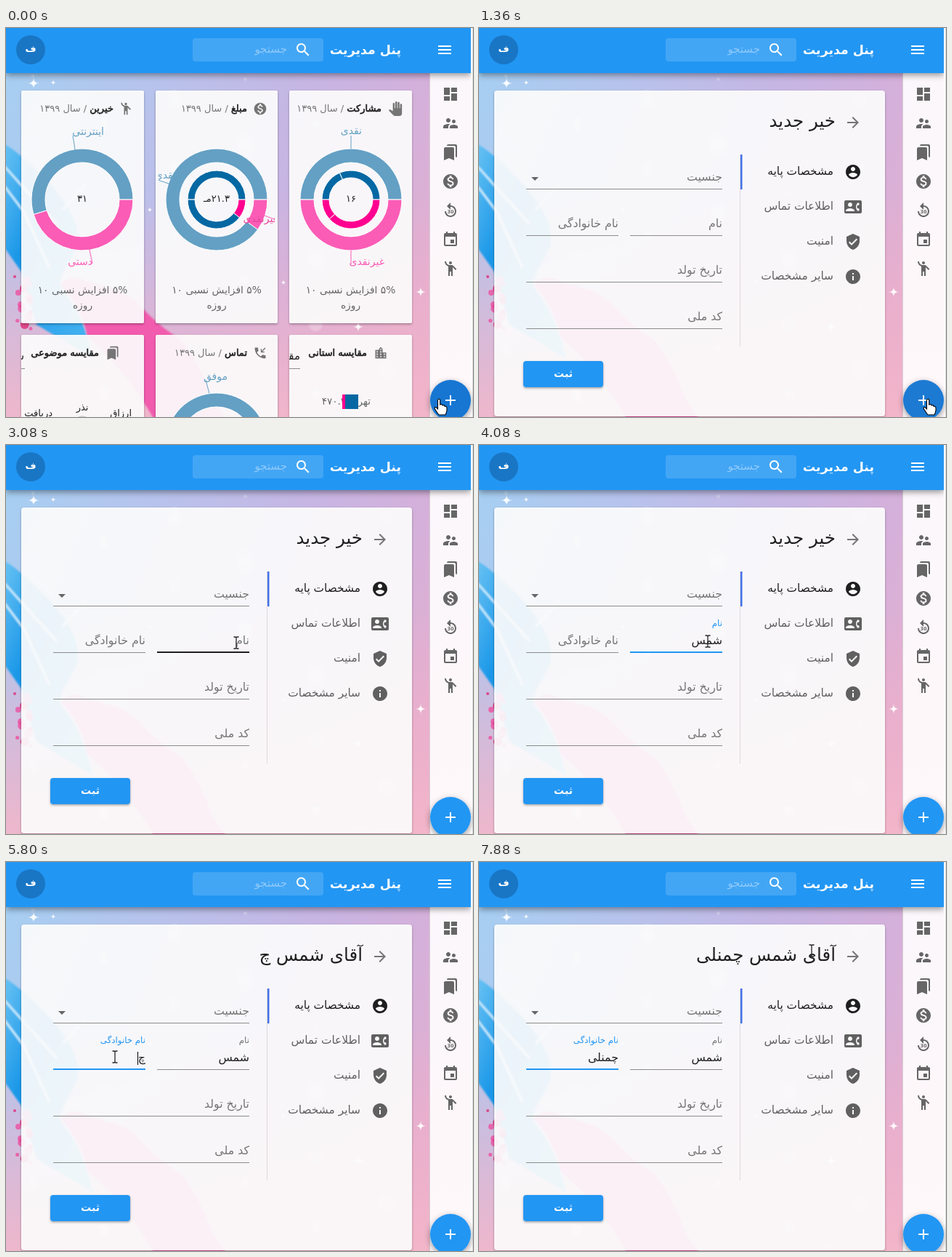
An HTML page for the animation above (8000 ms loop, 643 px wide and 535 px high).

```html
<!DOCTYPE html>
<html lang="fa">
<head>
<meta charset="utf-8">
<style>
html,body{margin:0;width:100%;height:100%;overflow:hidden;background:#fff}
svg{display:block;width:643px;height:535px;font-family:"DejaVu Sans",sans-serif}
text{direction:rtl}
.ltr{direction:ltr}
</style>
</head>
<body>
<svg id="stage" viewBox="0 0 643 535" xmlns="http://www.w3.org/2000/svg">
<defs>
  <linearGradient id="sky" x1="0" y1="0" x2="1" y2=".3">
    <stop offset="0" stop-color="#a6cff2"/><stop offset=".3" stop-color="#b7c3ec"/>
    <stop offset=".6" stop-color="#c6b6e4"/><stop offset=".85" stop-color="#d5b0da"/><stop offset="1" stop-color="#e2b0d0"/>
  </linearGradient>
  <linearGradient id="glow" x1="0" y1="0" x2="0" y2="1">
    <stop offset=".35" stop-color="#f3a9c8" stop-opacity="0"/><stop offset="1" stop-color="#f4b6c8" stop-opacity=".9"/>
  </linearGradient>
  <linearGradient id="arm" x1="0" y1="0" x2="1" y2="1">
    <stop offset="0" stop-color="#6cc4f4"/><stop offset=".35" stop-color="#1a97e8"/><stop offset="1" stop-color="#4ab6f2"/>
  </linearGradient>
  <filter id="soft"><feGaussianBlur stdDeviation="1.2"/></filter>
  <filter id="drop" x="-20%" y="-20%" width="140%" height="150%"><feDropShadow dx="0" dy="1.5" stdDeviation="1.5" flood-opacity=".35"/></filter>
  <filter id="lift" x="-60%" y="-60%" width="220%" height="220%"><feDropShadow dx="0" dy="3" stdDeviation="4" flood-opacity=".4"/></filter>
  <filter id="high" x="-80%" y="-80%" width="260%" height="260%"><feDropShadow dx="0" dy="6" stdDeviation="8" flood-opacity=".45"/></filter>
  <clipPath id="page"><rect y="62" width="640" height="473"/></clipPath>
  <clipPath id="c0"><rect x="21" y="86" width="169" height="449"/></clipPath>
  <clipPath id="c1"><rect x="210" y="86" width="160" height="449"/></clipPath>
  <clipPath id="c2"><rect x="390" y="86" width="169" height="449"/></clipPath>
</defs>
<g id="back" clip-path="url(#page)"></g>
<g id="dash"></g>
<g id="form"></g>
<g id="frame"></g>
<g id="top"></g>
</svg>
<script>
const LOOP = 8000;
const BLUE = '#2196f3', INK = '#1f1f1f', GREY = '#757575', LINE = '#8c8c8c';
const PALE = '#64a0c4', PINK = '#fa5cb6', DEEP = '#0568a3', HOT = '#ff0090';
const FIRST = 'شمس', LAST = 'چمنلی';
const $ = id => document.getElementById(id);
const add = (id, markup) => $(id).insertAdjacentHTML('beforeend', markup);

const disc = 'M12 2C6.48 2 2 6.48 2 12s4.48 10 10 10 10-4.48 10-10S17.52 2 12 2z';
const icons = {
  menu: 'M3 18h18v-2H3v2zm0-5h18v-2H3v2zm0-7v2h18V6H3z',
  search: 'M15.5 14h-.79l-.28-.27C15.41 12.59 16 11.11 16 9.5 16 5.91 13.09 3 9.5 3S3 5.91 3 9.5 5.91 16 9.5 16c1.61 0 3.09-.59 4.23-1.57l.27.28v.79l5 4.99L20.49 19zM9.5 14C7.01 14 5 11.99 5 9.5S7.01 5 9.5 5 14 7.01 14 9.5 11.99 14 9.5 14z',
  board: 'M3 13h8V3H3zm0 8h8v-6H3zm10 0h8V11h-8zm0-18v6h8V3z',
  people: 'M16.5 12c1.38 0 2.49-1.12 2.49-2.5S17.88 7 16.5 7 14 8.12 14 9.5s1.12 2.5 2.5 2.5zM9 11c1.66 0 2.99-1.34 2.99-3S10.66 5 9 5 6 6.34 6 8s1.34 3 3 3zm7.5 3c-1.83 0-5.5.92-5.5 2.75V19h11v-2.25c0-1.83-3.67-2.75-5.5-2.75zM9 13c-2.33 0-7 1.17-7 3.5V19h7v-2.25c0-.85.33-2.34 2.37-3.47C10.5 13.1 9.66 13 9 13z',
  marks: 'M19 18l2 1V3c0-1.1-.9-2-2-2H8.99C7.89 1 7 1.9 7 3h10c1.1 0 2 .9 2 2zM15 5H5c-1.1 0-2 .9-2 2v16l7-3 7 3V7c0-1.1-.9-2-2-2z',
  money: disc + 'm1.41 16.09V20h-2.67v-1.93c-1.71-.36-3.16-1.46-3.27-3.4h1.96c.1 1.05.82 1.87 2.65 1.87 1.96 0 2.4-.98 2.4-1.59 0-.83-.44-1.61-2.67-2.14-2.48-.6-4.18-1.62-4.18-3.67 0-1.72 1.39-2.84 3.11-3.21V4h2.67v1.95c1.86.45 2.79 1.86 2.85 3.39H14.3c-.05-1.11-.64-1.87-2.22-1.87-1.5 0-2.4.68-2.4 1.64 0 .84.65 1.39 2.67 1.91s4.18 1.39 4.18 3.91c-.01 1.83-1.38 2.83-3.12 3.16z',
  replay: 'M12 5V1L7 6l5 5V7c3.31 0 6 2.69 6 6s-2.69 6-6 6-6-2.69-6-6H4c0 4.42 3.58 8 8 8s8-3.58 8-8-3.58-8-8-8z',
  event: 'M17 12h-5v5h5zM16 1v2H8V1H6v2H5c-1.11 0-1.99.9-1.99 2L3 19c0 1.1.89 2 2 2h14c1.1 0 2-.9 2-2V5c0-1.1-.9-2-2-2h-1V1zm3 18H5V8h14z',
  wave: 'M12 2a2 2 0 1 0 .01 0zM15.89 8.11C15.5 7.72 14.83 7 13.53 7h-2.54C8.24 6.99 6 4.75 6 2H4c0 3.16 2.11 5.84 5 6.71V22h2v-6h2v6h2V10.05L18.95 14l1.41-1.41z',
  hand: 'M23 5.5V20c0 2.2-1.8 4-4 4h-7.3c-1.08 0-2.1-.43-2.85-1.19L1 14.83s1.26-1.23 1.3-1.25c.22-.19.49-.29.79-.29.22 0 .42.06.6.16.04.01 4.31 2.46 4.31 2.46V4c0-.83.67-1.5 1.5-1.5S11 3.17 11 4v7h1V1.5c0-.83.67-1.5 1.5-1.5S15 .67 15 1.5V11h1V2.5c0-.83.67-1.5 1.5-1.5s1.5.67 1.5 1.5V11h1V5.5c0-.83.67-1.5 1.5-1.5s1.5.67 1.5 1.5z',
  call: 'M20 15.5c-1.25 0-2.45-.2-3.57-.57-.35-.1-.74-.04-1.02.24l-2.2 2.2c-2.83-1.44-5.15-3.75-6.59-6.58l2.2-2.21c.28-.27.36-.66.25-1.01C8.7 6.45 8.5 5.25 8.5 4c0-.55-.45-1-1-1H4c-.55 0-1 .45-1 1 0 9.39 7.61 17 17 17 .55 0 1-.45 1-1v-3.5c0-.55-.45-1-1-1zM13 11h6V9.5h-3.4L21 4.1 19.9 3l-5.4 5.4V5H13z',
  city: 'M15 11V5l-3-3-3 3v2H3v14h18V11zm-8 8H5v-2h2zm0-4H5v-2h2zm0-4H5V9h2zm6 8h-2v-2h2zm0-4h-2v-2h2zm0-4h-2V9h2zm0-4h-2V5h2zm6 12h-2v-2h2zm0-4h-2v-2h2z',
  user: disc + 'm0 3c1.66 0 3 1.34 3 3s-1.34 3-3 3-3-1.34-3-3 1.34-3 3-3zm0 14.2c-2.5 0-4.71-1.28-6-3.22.03-1.99 4-3.08 6-3.08 1.99 0 5.97 1.09 6 3.08-1.29 1.94-3.5 3.22-6 3.22z',
  contact: 'M22 3H2C.9 3 0 3.9 0 5v14c0 1.1.9 2 2 2h20c1.1 0 2-.9 2-2V5c0-1.1-.9-2-2-2zM8 6c1.66 0 3 1.34 3 3s-1.34 3-3 3-3-1.34-3-3 1.34-3 3-3zm6 12H2v-1c0-2 4-3.1 6-3.1s6 1.1 6 3.1zm3.85-4h1.64L21 16l-1.99 1.99c-1.31-.98-2.28-2.38-2.73-3.99-.37-1.3-.37-2.7 0-4 .45-1.62 1.42-3.01 2.73-3.99L21 8l-1.51 2h-1.64c-.45 1.3-.45 2.7 0 4z',
  shield: 'M12 1L3 5v6c0 5.55 3.84 10.74 9 12 5.16-1.26 9-6.45 9-12V5zm-2 16l-4-4 1.41-1.41L10 14.17l6.59-6.59L18 9z',
  info: disc + 'm1 15h-2v-6h2zm0-8h-2V7h2z',
  next: 'M12 4l-1.41 1.41L16.17 11H4v2h12.17l-5.58 5.59L12 20l8-8z',
  plus: 'M19 13h-6v6h-2v-6H5v-2h6V5h2v6h6z',
  drop: 'M7 10l5 5 5-5z'
};

const icon = (name, x, y, fill = '#666', size = 24) =>
  `<path d="${icons[name]}" fill="${fill}" fill-rule="evenodd" transform="translate(${x - size / 2} ${y - size / 2}) scale(${size / 24})"/>`;
const text = (s, x, y, size, fill, extra = '') =>
  `<text x="${x}" y="${y}" font-size="${size}" fill="${fill}" ${extra}>${s}</text>`;
const rect = (x, y, w, h, fill, extra = '') =>
  `<rect x="${x}" y="${y}" width="${w}" height="${h}" fill="${fill}" ${extra}/>`;
const stroke = (d, color, width = 1) => `<path d="${d}" fill="none" stroke="${color}" stroke-width="${width}"/>`;
const MID = 'text-anchor="middle" ', BOLD = 'font-weight="bold"';
// A semibold look that keeps the width of the regular face.
const heavy = color => `stroke="${color}" stroke-width=".6"`;

// Ring sector; angles in degrees, counterclockwise from the right.
function sector(cx, cy, r, R, a, b, fill) {
  const at = (q, deg) => {
    const t = deg * Math.PI / 180;
    return `${cx + q * Math.cos(t)} ${cy - q * Math.sin(t)}`;
  };
  const big = b - a > 180 ? 1 : 0;
  return `<path d="M${at(R, a)}A${R} ${R} 0 ${big} 0 ${at(R, b)}L${at(r, b)}A${r} ${r} 0 ${big} 1 ${at(r, a)}z" fill="${fill}" stroke="#fff"/>`;
}
const outer = (cx, cy, cut) => sector(cx, cy, 51, 70, 0, cut, PALE) + sector(cx, cy, 51, 70, cut, 360, PINK);
const inner = (cx, cy, ...parts) => parts.map(([a, b, c]) => sector(cx, cy, 30, 40, a, b, c)).join('');

function drawBack() {
  let s = rect(0, 62, 640, 473, 'url(#sky)') + rect(0, 62, 640, 473, 'url(#glow)');
  // Out-of-focus lights.
  s += '<g filter="url(#soft)" fill="#fff">';
  for (let i = 0; i < 40; i++) {
    const x = (i * 97.3 + 38) % 584, y = 66 + (i * 61.7 + 9) % 465;
    s += `<circle cx="${x}" cy="${y}" r="${2 + i % 5 * 2.5}" opacity="${.4 - i % 5 * .05}"/>`;
  }
  s += '</g><g filter="url(#soft)">';
  s += '<path d="M-5 158C14 168 40 192 62 216 84 242 104 270 98 300 88 325 72 340 75 356 90 375 108 400 120 455L96 440 42 408 21 335-5 298z" fill="url(#arm)"/>';
  s += stroke('M-4 215L24 252 60 330M-4 188L20 215 70 270M110 215L78 250', '#c4e9fc', 3);
  s += '<path d="M75 353Q90 338 110 348L143 358Q165 362 184 381 212 412 239 427 262 450 285 511L305 540H205Q165 470 112 425 105 385 75 353z" fill="#f25bae"/>';
  s += '</g>';
  for (let i = 0; i < 14; i++)
    s += `<circle cx="${12 + 22 * Math.abs(Math.sin(i * 2.3))}" cy="${342 + i * 5.5}" r="${2 + 4 * Math.abs(Math.sin(i * 1.7))}" fill="${i % 3 ? '#ee4a9c' : '#e0206f'}" opacity=".75"/>`;
  for (const [x, y, r] of [[38, 76, 8], [65, 75, 4], [198, 250, 4], [485, 411, 7], [571, 363, 7], [382, 350, 4]])
    s += `<path d="M${x - r} ${y}Q${x} ${y} ${x} ${y - r} ${x} ${y} ${x + r} ${y} ${x} ${y} ${x} ${y + r} ${x} ${y} ${x - r} ${y}z" fill="#fff" opacity=".9"/>`;
  add('back', s);
}

function drawDash() {
  let s = '';
  const cards = [[21, 'خیرین', 'wave', 148, 165], [206, 'مبلغ', 'money', 332, 350], [390, 'مشارکت', 'hand', 517, 536]];
  const title = (name, x, y, year) =>
    text(`<tspan fill="${INK}" ${heavy(INK)}>${name}</tspan>${year ? ' / سال ۱۳۹۹' : ''}`, x, y, 13, GREY);
  for (const [x, name, pic, right, ix] of cards) {
    const w = x === 206 ? 168 : 169, mid = x + w / 2;
    s += rect(x, 86, w, 320, '#fff', 'fill-opacity=".9" rx="2" filter="url(#drop)"');
    s += rect(x, 422, w, 130, '#fff', 'fill-opacity=".9" rx="2" filter="url(#drop)"');
    s += title(name, right, 115, true) + icon(pic, ix, 111, GREY, 20);
    s += text('۵% افزایش نسبی ۱۰', mid, 365, 13.8, '#666', MID) + text('روزه', mid, 386, 13.8, '#666', MID);
  }
  s += outer(105, 236, 197) + text('۳۱', 105, 239, 13, INK, MID);
  s += stroke('M95 167L92 148', PALE) + text('اینترنتی', 135, 147, 14, PALE);
  s += stroke('M115 305L119 324', PINK) + text('دستی', 119, 326, 14, PINK);

  s += outer(290, 236, 324) + inner(290, 236, [0, 180, DEEP], [180, 322, DEEP], [322, 360, HOT]);
  s += text('۲۱.۳مـ', 290, 239, 13, INK, MID);
  s += '<g clip-path="url(#c1)">' + stroke('M224 214L209 209', PALE) + text('نقدی', 234, 207, 14, PALE);
  s += stroke('M356 258L372 264', PINK) + text('غیرنقدی', 375, 267, 14, '#e8489f') + '</g>';

  s += outer(475, 236, 180) + inner(475, 236, [0, 113, DEEP], [113, 180, DEEP], [180, 222, HOT], [222, 360, HOT]);
  s += text('۱۶', 475, 239, 13, INK, MID);
  s += stroke('M475 166V148', PALE) + text('نقدی', 490, 146, 14, PALE);
  s += stroke('M475 306V325', PINK) + text('غیرنقدی', 521, 326, 14, PINK);

  s += title('مقایسه موضوعی', 128, 451) + icon('marks', 147, 447, GREY, 20);
  s += title('تماس', 332, 451, true) + icon('call', 350, 447, GREY, 20);
  s += title('مقایسه استانی', 497, 451) + icon('city', 516, 447, GREY, 20);
  s += '<g clip-path="url(#c0)">' + text('س', 25, 456, 15, INK) + rect(21, 468, 5, 1, LINE);
  s += text('نذر', 105, 526, 13, INK, MID) + text('دریافت', 64, 534, 13, INK) + text('ارزاق', 173, 534, 13, INK);
  s += stroke('M98 536Q105 532 112 536', '#bbb') + '</g>';
  s += stroke('M280 503L275 484', PALE) + text('موفق', 305, 484, 14, PALE) + outer(290, 572, 180);
  s += '<g clip-path="url(#c2)">' + text('مقایسه', 405, 456, 15, INK) + rect(390, 468, 15, 1, LINE) + '</g>';
  s += text('تهران', 502, 518, 13.5, '#666') + text('۴۷۰.۲', 468, 518, 13.5, '#666');
  s += rect(463, 504, 22, 20, DEEP) + rect(463, 504, 4, 20, HOT);
  add('dash', s);
}

function drawForm() {
  let s = rect(21, 86, 538, 448, '#fff', 'fill-opacity=".9" rx="4" filter="url(#drop)"');
  s += icon('next', 515, 130, GREY) + text('', 491, 136, 24.5, INK, 'id="head"');
  s += rect(359, 174, 1, 264, '#dcd8dd') + rect(360, 174, 2.5, 48, '#4472e8');
  [['مشخصات پایه', 'user'], ['اطلاعات تماس', 'contact'], ['امنیت', 'shield'], ['سایر مشخصات', 'info']].forEach(([name, pic], i) => {
    const y = 198 + i * 48;
    s += text(name, 488, y + 4, 15.4, i ? '#606060' : INK) + icon(pic, 515, y, i ? '#606060' : INK);
  });
  const field = (label, x, right, y, id) =>
    rect(x, y + 15, right - x, 1, LINE, id ? `id="${id}Line"` : '') + text(label, right, y + 4, 15.8, GREY, id ? `id="${id}Label"` : '');
  s += field('جنسیت', 65, 335, 206) + icon('drop', 77, 207, '#666');
  s += field('نام', 208, 335, 270, 'first') + field('نام خانوادگی', 65, 192, 270, 'last');
  s += field('تاریخ تولد', 65, 335, 334) + field('کد ملی', 65, 335, 398);
  s += text('', 335, 274, 15.8, INK, 'id="firstText"') + text('', 192, 274, 15.8, INK, 'id="lastText"');
  s += rect(268, 284, 6, 2, BLUE, 'id="rest"') + rect(0, 261, 1, 18, '#000', 'id="caret"');
  s += rect(61, 458, 110, 36, BLUE, 'rx="4" filter="url(#drop)"') + text('ثبت', 116, 480, 14, '#fff', MID + BOLD);
  add('form', s);
}

function drawFrame() {
  let s = rect(584, 62, 56, 473, '#fff', 'fill-opacity=".9"') + rect(583, 62, 1, 473, '#d9cdd6');
  ['board', 'people', 'marks', 'money', 'replay', 'event', 'wave'].forEach((name, i) => s += icon(name, 612, 91 + i * 40));
  s += text('30', 612, 255, 6.5, '#666', `class="ltr" ${MID + BOLD}`);
  s += rect(0, 0, 640, 62, BLUE, 'filter="url(#lift)"');
  s += rect(640, 0, 3, 535, '#fff') + rect(642, 0, 1, 535, '#dcdcdc');
  s += icon('menu', 604, 30, '#fff') + text('پنل مدیریت', 544, 36, 17.4, '#fff', BOLD);
  s += rect(257, 14, 180, 32, '#fff', 'fill-opacity=".15" rx="4"') + icon('search', 409, 30, '#fff');
  s += text('جستجو', 387, 34, 15, '#90caf9');
  s += '<circle cx="34" cy="30" r="20" fill="#1976c5"/>' + text('ف', 34, 33, 13, '#fff', MID + BOLD);
  s += `<circle id="fab" cx="612" cy="512" r="28"/>` + icon('plus', 612, 512, '#fff');
  add('frame', s);

  s = '<g id="status"><path d="M0 519H211Q214 519 214 522V535H0z" fill="#292c30"/>' +
    text('Waiting for localhost...', 2, 533.5, 12, '#a3a8ad', 'class="ltr" style="font-family:\'Open Sans\',sans-serif"') + '</g>';
  // Each pointer has its hot spot at the origin.
  s += '<g id="pointer">';
  s += '<path id="link" d="M-1.5 1.5Q0-1 1.7 1.5V8Q4 6.500 5 9 7.500 8 8.300 10.500 11 9.500 11 13V16Q10.500 19 9 22H0Q-3 18-5.500 14-6.500 11-4 11.500L-1.500 14z" fill="#fff" stroke="#000" stroke-width="1.1"/>';
  s += '<path id="arrow" d="M0 0V16.500L4 13 6.500 19 9 18 6.500 12.200H12z" fill="#fff" stroke="#000"/>';
  s += '<path id="beam" d="M-3.500-8H-1L0-7 1-8H3.500M0-7V7M-3.500 8H-1L0 7 1 8H3.500" fill="none" stroke="#222" stroke-width="1.3"/></g>';
  add('top', s);
}

// Pointer: start time, shape, x, y.
const moves = [
  [0, 'link', 596, 510], [320, 'link', 618, 510], [1680, 'link', 609, 511], [2040, 'link', 599, 502],
  [2360, 'arrow', 430, 358], [2720, 'beam', 305, 258], [3080, 'beam', 317, 272], [3400, 'beam', 315, 270],
  [4440, 'beam', 282, 264], [4760, 'beam', 160, 266], [5120, 'beam', 150, 268],
  [6480, 'arrow', 153, 248], [6840, 'beam', 162, 256], [7200, 'arrow', 257, 167],
  [7520, 'beam', 341, 129], [7880, 'beam', 458, 122]
];
const fabs = [[0, '#1976d2', 'lift'], [680, '#3a89d9', 'high'], [1040, '#5c9fe0', 'lift'], [1360, '#1f7ad3', 'lift'], [1680, '#1976d2', 'lift'], [2360, BLUE, 'lift']];
const typed = [[0, 0], [5800, 1], [6160, 4], [6480, 5]];
const blinks = [[0, 0], [3400, 1], [4080, 0], [4440, 1], [4760, 0], [5120, 1], [5440, 0], [5800, 1], [6840, 0], [7520, 1], [7880, 0]];
const pick = (steps, t) => steps.filter(step => step[0] <= t).pop();

const set = (id, attrs) => { for (const k in attrs) $(id).setAttribute(k, attrs[k]); };
const show = (id, on) => { $(id).style.display = on ? '' : 'none'; };

function paintField(id, mode, floating) {
  const thick = mode !== 'rest';
  set(id + 'Line', { y: thick ? 284 : 285, height: thick ? 2 : 1, fill: mode === 'focus' ? BLUE : mode === 'hover' ? INK : LINE });
  set(id + 'Label', { y: floating ? 249 : 274, 'font-size': floating ? 11.8 : 15.8, fill: mode === 'focus' ? BLUE : GREY });
}

function render(t) {
  show('dash', t < 1360);
  show('form', t >= 1360);
  show('status', t >= 1040 && t < 1360);

  const [, color, shade] = pick(fabs, t);
  set('fab', { fill: color, filter: `url(#${shade})` });

  const [, kind, x, y] = pick(moves, t);
  for (const k of ['link', 'arrow', 'beam']) show(k, k === kind);
  set('pointer', { transform: `translate(${x} ${y})` });

  const onLast = t >= 5120, count = pick(typed, t)[1], part = LAST.slice(0, count);
  paintField('first', t < 2720 || onLast ? 'rest' : t < 3400 ? 'hover' : 'focus', t >= 3400);
  paintField('last', onLast ? 'focus' : t >= 4760 ? 'hover' : 'rest', onLast);
  $('firstText').textContent = t >= 3760 ? FIRST : '';
  $('lastText').textContent = part;
  $('head').textContent = count ? `آقای ${FIRST} ${part}` : 'خیر جدید';
  show('rest', t >= 5120 && t < 5440);

  const edge = onLast ? 191 : 334;
  const width = $(onLast ? 'lastText' : 'firstText').getComputedTextLength();
  set('caret', { x: Math.round(edge - width) });
  show('caret', pick(blinks, t)[1]);
}

drawBack();
drawDash();
drawForm();
drawFrame();
const start = performance.now();
(function tick() {
  render((performance.now() - start) % LOOP);
  requestAnimationFrame(tick);
})();
</script>
</body>
</html>
```
